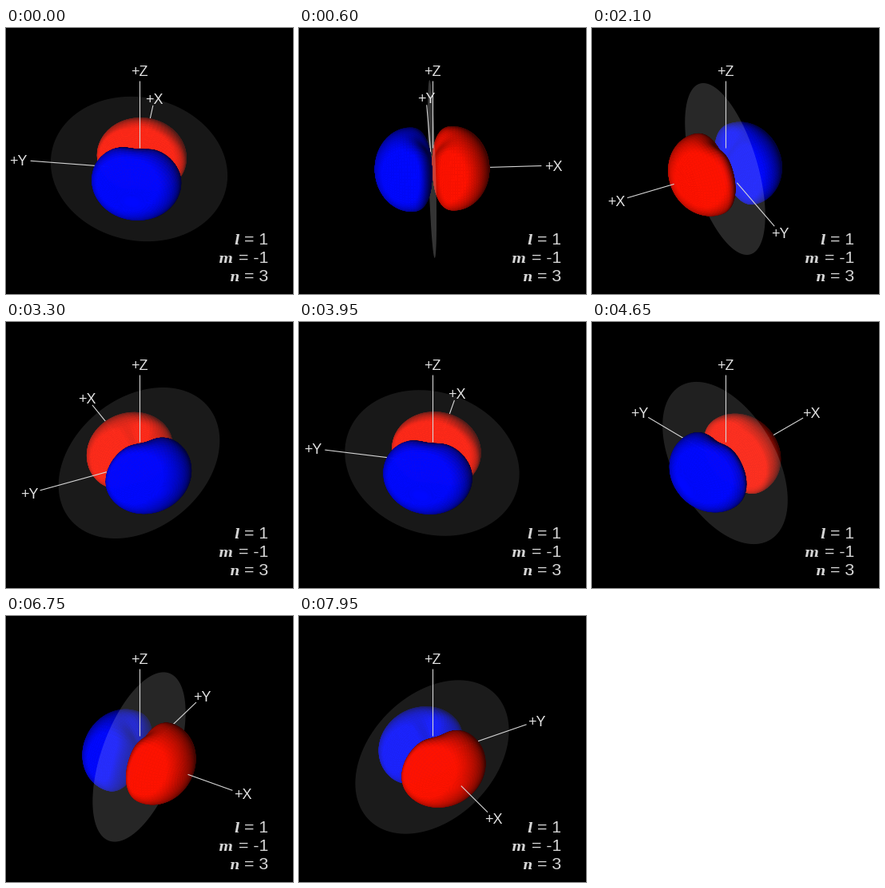
A matplotlib script for the animation above (8000 ms loop, 359x333 px).

```python
import numpy as np
import matplotlib.pyplot as plt
from matplotlib.animation import FuncAnimation
from matplotlib.collections import PolyCollection
from matplotlib.patches import Polygon, Rectangle

W, H, DPI = 359, 333, 100
FRAMES, STEP = 160, 50
CX, CY = 166.5, 176.5
TILT_SIN, TILT_COS = 0.586, 0.81
AXIS_IN, AXIS_LEN, LABEL_AT = 33, 137, 152
DISC_R, LOBE_TIP = 111.5, 71.5
RED, BLUE = np.array([1, 0.07, 0]), np.array([0, 0.03, 1])
LIGHT = np.array([-0.3, -0.15, 0.94])


def px(n):
    return n * 72 / DPI


def spin(t):
    """Angle of the X axis in radians: a spin that dies away, slightly uneven."""
    deg = 82.7 - 586.6 * (1 - np.exp(-t / 4100))
    deg += np.interp(t, [0, 1250, 2100, 3300, 4650, 5600, 7950],
                     [0, 0, -0.8, -3.1, -0.2, -1.2, 0])
    return np.radians(deg)


def turn(p, a):
    """World points to (right, up, toward the viewer)."""
    x, y, z = p[..., 0], p[..., 1], p[..., 2]
    right = x * np.cos(a) - y * np.sin(a)
    back = x * np.sin(a) + y * np.cos(a)
    return np.stack([right, TILT_SIN * back + TILT_COS * z,
                     TILT_SIN * z - TILT_COS * back], axis=-1)


def to_screen(v):
    return np.stack([CX + v[..., 0], CY - v[..., 1]], axis=-1)


def build_lobe(side, rows=40, cols=72):
    """Quads and normals of one lobe: round outside, flat inside, dented at the poles."""
    t = np.linspace(0, np.pi, rows + 1)[:, None]
    phi = np.linspace(0, 2 * np.pi, cols + 1)[None, :]
    c, s = np.cos(t), np.sin(t)
    inner = c < 0
    power = np.where(inner, 2 / 2.4, 1)
    axial = 26 + np.where(inner, -25.3, 45.5) * np.abs(c) ** power
    radial = np.abs(s) ** power
    off = np.arcsin(np.clip(np.abs(np.cos(phi)), 0, 1)) - np.pi / 2
    dent = 1 - 0.23 * np.exp(-(off / 0.36) ** 2) * np.exp(-(axial / 22) ** 2)
    x = side * axial + 0 * phi
    y = 56 * radial * np.sin(phi) * dent
    z = 50.8 * radial * np.cos(phi) * dent
    p = np.stack([x, y, z], axis=-1)
    quads = np.stack([p[:-1, :-1], p[1:, :-1], p[1:, 1:], p[:-1, 1:]], axis=2)
    quads = quads.reshape(-1, 4, 3)
    n = np.cross(quads[:, 2] - quads[:, 0], quads[:, 3] - quads[:, 1])
    n /= np.linalg.norm(n, axis=1, keepdims=True) + 1e-9
    out = quads.mean(axis=1) - [side * 26, 0, 0]
    n *= np.sign((n * out).sum(axis=1, keepdims=True))
    return quads, n


fig = plt.figure(figsize=(W / DPI, H / DPI), dpi=DPI, facecolor="black")
ax = fig.add_axes([0, 0, 1, 1])
ax.set_xlim(0, W)
ax.set_ylim(H, 0)
ax.axis("off")

lobes = []
for side, color in ((1, RED), (-1, BLUE)):
    art = PolyCollection([], linewidths=0.4)
    ax.add_collection(art, autolim=False)
    lobes.append((side, color, *build_lobe(side), art))

ring = np.linspace(0, 2 * np.pi, 121)
disc_pts = DISC_R * np.stack([0 * ring, np.cos(ring), np.sin(ring)], axis=-1)
disc = ax.add_patch(Polygon(np.zeros((3, 2)), fc="white", lw=0, zorder=3))

axes3d = []
for name, vec, start in (("X", (1, 0, 0), LOBE_TIP), ("Y", (0, 1, 0), AXIS_IN),
                         ("Z", (0, 0, 1), AXIS_IN)):
    line, = ax.plot([], [], color="#d6d6d6", lw=px(1.1), zorder=4,
                    solid_capstyle="butt")
    label = ax.text(0, 0, "+" + name, color="#e2e2e2", family="Liberation Sans",
                    size=px(18), ha="center", va="center_baseline", zorder=7)
    axes3d.append((np.array(vec, float), start, line, label))

# the scene stops short of the right border
ax.add_patch(Rectangle((329, 0), W - 329, H, fc="black", lw=0, zorder=8))

for sym, left, value, base in (("l", 285, "= 1", 271), ("m", 265, "= -1", 294),
                               ("n", 279, "= 3", 317)):
    ax.text(left, base, sym, color="#d4d4d4", family="DejaVu Serif",
            style="italic", weight="bold", size=px(17), va="baseline", zorder=9)
    ax.text(328, base, value, color="#d8d8d8", family="Liberation Sans",
            size=px(21.3), ha="right", va="baseline", zorder=9)


def draw_lobe(side, color, quads, normals, art, a):
    n = turn(normals, a)
    seen = n[:, 2] > -0.05
    v, n = turn(quads[seen], a), n[seen]
    order = np.argsort(v[..., 2].mean(axis=1))
    shade = np.clip(0.35 + 0.86 * (n[order] @ LIGHT), 0.25, 1)
    colors = shade[:, None] * color
    art.set_verts(to_screen(v[order]))
    art.set_facecolor(colors)
    art.set_edgecolor(colors)
    art.set_zorder(5 if side * np.sin(a) < 0 else 2)


def draw(i):
    a = spin(i * STEP)
    for lobe in lobes:
        draw_lobe(*lobe, a)

    disc.set_xy(to_screen(turn(disc_pts, a)))
    disc.set_alpha((55 - 38 * TILT_COS * abs(np.sin(a))) / 255)

    for vec, start, line, label in axes3d:
        d = turn(vec, a)
        line.set_data(*to_screen(np.outer([start, AXIS_LEN], d)).T)
        label.set_position(to_screen(d * LABEL_AT))
    axes3d[0][2].set_zorder(6 if np.sin(a) < 0 else 1)
    return []


anim = FuncAnimation(fig, draw, frames=FRAMES, interval=STEP,
                     init_func=lambda: draw(0), repeat=True, repeat_delay=0)
plt.show()
```
